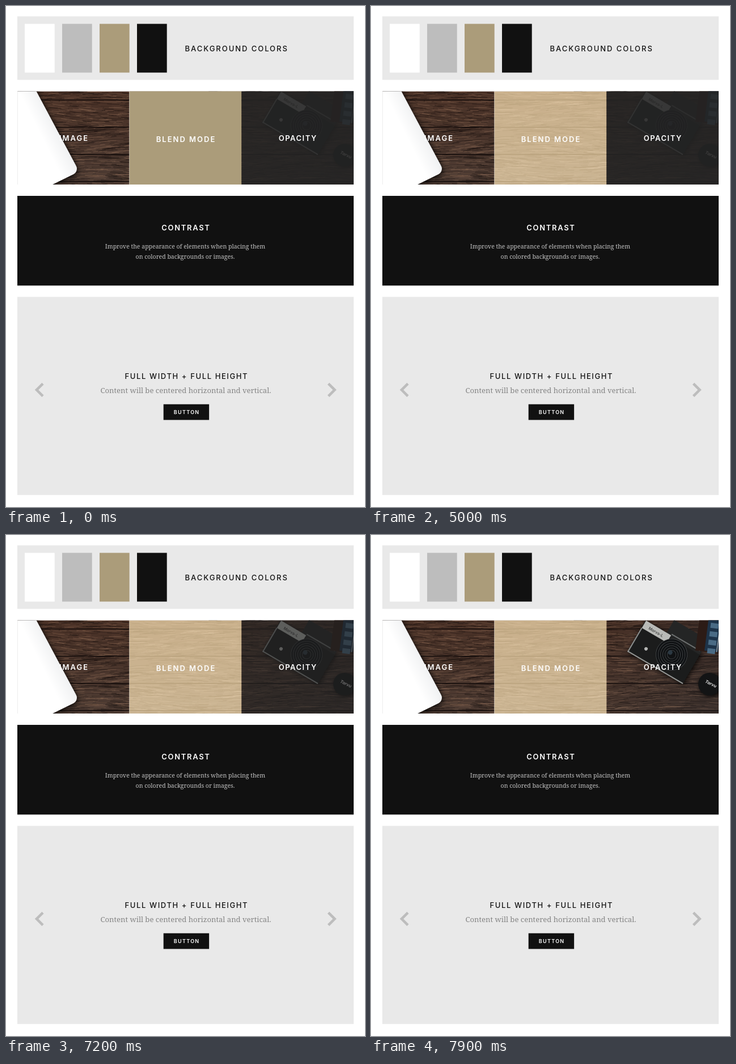
Recreate the animation shown at these times as an HTML page with a canvas. Size 633 px wide and 884 px high, loop 8 s.

```html
<!DOCTYPE html>
<html lang="en">
<head>
<meta charset="utf-8">
<title>Background styles</title>
<style>
  html, body { margin: 0; width: 100%; height: 100%; overflow: hidden; background: #fff; }
  canvas { display: block; }
</style>
</head>
<body>
<canvas id="stage" width="633" height="884"></canvas>
<script>
const W = 633, H = 884, LOOP = 8000;
const LEFT = 20, WIDE = 593, TOP = 150.5, TALL = 164.5, THIRD = WIDE / 3;
const TAN = '#ab9c7a', INK = '#111', PANEL = '#e9e9e9', GREY = '#bdbdbd';
const SANS = 'Inter, sans-serif', SERIF = '"Noto Serif", serif';
const stage = document.getElementById('stage').getContext('2d');

function layer() {
  const c = document.createElement('canvas');
  c.width = W;
  c.height = H;
  return c.getContext('2d');
}

function rect(g, x, y, w, h, fill) {
  g.fillStyle = fill;
  g.fillRect(x, y, w, h);
}

function disc(g, x, y, r, fill) {
  g.fillStyle = fill;
  g.beginPath();
  g.arc(x, y, r, 0, Math.PI * 2);
  g.fill();
}

// Centred on the visible letters: the trailing letter space is compensated.
function text(g, str, x, y, font, color, spacing = 0) {
  g.font = font;
  g.fillStyle = color;
  g.textAlign = 'center';
  g.letterSpacing = spacing + 'px';
  g.fillText(str, x + spacing / 2, y);
}

function tilted(g, x, y, angle, paint) {
  g.save();
  g.translate(x, y);
  g.rotate(angle);
  paint();
  g.restore();
}

function withShadow(g, blur, paint) {
  g.save();
  g.shadowColor = 'rgba(0,0,0,.85)';
  g.shadowBlur = blur;
  g.shadowOffsetX = g.shadowOffsetY = 2;
  paint();
  g.restore();
}

function seeded(seed) {
  return () => (seed = (seed * 16807) % 2147483647) / 2147483647;
}

function drawWood(g) {
  const rnd = seeded(77), plank = 48;
  const base = g.createLinearGradient(0, TOP, 0, TOP + TALL);
  base.addColorStop(0, '#4a3126');
  base.addColorStop(1, '#4b3a32');
  rect(g, LEFT, TOP, WIDE, TALL, base);

  for (let i = 0; i < 2600; i++) {
    const x = rnd() * W, y = TOP + rnd() * TALL, len = 8 + rnd() * 38;
    const slope = Math.sin(x / 60 + Math.floor((y - 22) / plank) * 2) * 0.12;
    g.strokeStyle = rnd() < 0.6 ? 'rgba(14,9,8,.42)' : 'rgba(176,134,106,.28)';
    g.lineWidth = 0.5 + rnd() * 0.7;
    g.beginPath();
    g.moveTo(x, y);
    g.quadraticCurveTo(x + len / 2, y + slope * len, x + len, y + slope * len * 0.6);
    g.stroke();
  }
  for (let y = 166; y < TOP + TALL; y += plank) rect(g, LEFT, y - 1, WIDE, 1.6, '#150d0b');

  const cool = g.createLinearGradient(400, 0, 613, 0);
  cool.addColorStop(0, 'rgba(38,36,38,0)');
  cool.addColorStop(1, 'rgba(38,36,38,.4)');
  rect(g, 400, TOP, 213, TALL, cool);
}

function drawLaptop(g) {
  const shade = g.createLinearGradient(70, 245, 108, 226);
  shade.addColorStop(0, '#fff');
  shade.addColorStop(0.7, '#f1f2f3');
  shade.addColorStop(1, '#cfd3d5');
  withShadow(g, 10, () => {
    g.fillStyle = shade;
    g.beginPath();
    g.moveTo(0, 140);
    g.lineTo(48, 140);
    g.arcTo(129, 292, 74, 319, 11);
    g.lineTo(74, 319);
    g.lineTo(0, 319);
    g.fill();
  });
}

function drawCamera(g) {
  tilted(g, 530, 211, 0.53, () => {
    withShadow(g, 9, () => rect(g, -70, -29, 113, 64, '#1b1c1c'));
    rect(g, -27, -55, 70, 30, '#242525');
    rect(g, -69, -29, 51, 15, '#b9bab7');
    rect(g, -70, -14, 2, 49, '#8d908f');
    rect(g, -70, 33, 113, 2, '#959795');
    rect(g, -18, -32, 58, 2, '#6d7070');
    disc(g, -44, 14, 3, '#b5b6b4');
    text(g, 'Morva-L', -44, -18, '600 7px ' + SANS, '#464746');
    for (let r = 28; r > 4; r -= 4) {
      disc(g, 0, 0, r, '#45484a');
      disc(g, 0, 0, r - 0.8, '#101214');
    }
    disc(g, -4, -2, 4, '#2b3842');
  });
}

function drawAccessories(g) {
  tilted(g, 593, 150, 0.13, () => {
    rect(g, -14, -10, 44, 66, '#2c1b16');
    rect(g, 2, -10, 24, 64, '#1d3349');
    for (let y = 4; y < 50; y += 15) rect(g, 7, y, 14, 9, '#4a6b85');
    rect(g, 23, -10, 1.2, 64, '#b4b9ba');
  });
  withShadow(g, 6, () => disc(g, 597, 263, 20, '#131415'));
  tilted(g, 599, 263, 0.47, () => text(g, 'Tarvu', 0, 2, 'italic 700 7.5px ' + SANS, '#dedede'));
}

function makePhoto() {
  const g = layer();
  g.beginPath();
  g.rect(LEFT, TOP, WIDE, TALL);
  g.clip();
  drawWood(g);
  drawLaptop(g);
  drawCamera(g);
  drawAccessories(g);
  rect(g, LEFT, TOP, 1, TALL, '#ededed');
  return g.canvas;
}

function chevron(g, x, dir) {
  g.strokeStyle = GREY;
  g.lineWidth = 4.6;
  g.beginPath();
  for (const side of [-1, 0, 1]) g.lineTo(x + 11 * dir * Math.abs(side), 677.3 + 11 * side);
  g.stroke();
}

function makePage() {
  const g = layer(), middle = W / 2;
  rect(g, 0, 0, W, H, '#fff');

  rect(g, LEFT, 18.3, WIDE, 112, PANEL);
  ['#fff', GREY, TAN, INK].forEach((color, i) => rect(g, 33 + i * 66, 31.5, 52.7, 86, color));
  text(g, 'BACKGROUND COLORS', 405.7, 80, '500 13px ' + SANS, INK, 1.95);

  rect(g, LEFT, 335, WIDE, 158.3, INK);
  text(g, 'CONTRAST', middle, 395.8, '600 13px ' + SANS, '#fff', 1.7);
  ['Improve the appearance of elements when placing them', 'on colored backgrounds or images.']
    .forEach((row, i) => text(g, row, 316, 428 + i * 18, '10.5px ' + SERIF, '#c4c4c4'));

  rect(g, LEFT, 513.3, WIDE, 349.5, PANEL);
  text(g, 'FULL WIDTH + FULL HEIGHT', 317.6, 657.7, '500 13px ' + SANS, INK, 1.6);
  text(g, 'Content will be centered horizontal and vertical.', 317, 682.5, '13.05px ' + SERIF, '#858585');
  rect(g, 277.7, 702.7, 80.4, 27.7, INK);
  text(g, 'BUTTON', 318, 719.6, '600 9px ' + SANS, '#fff', 1.3);
  chevron(g, 54, 1);
  chevron(g, 579.5, -1);

  g.drawImage(makePhoto(), 0, 0);
  return g.canvas;
}

function tint(mode, color) {
  stage.globalCompositeOperation = mode;
  rect(stage, LEFT + THIRD, TOP, THIRD, TALL, color);
  stage.globalCompositeOperation = 'source-over';
}

function drawBlend(t) {
  if (t < 1000) {
    tint('source-over', TAN);
  } else if (t >= 5000) {
    tint('screen', '#b49e78');
  } else if (t >= 3000) {
    tint('color', '#a98d64');
    tint('screen', '#231e17');
  }
  rect(stage, LEFT + THIRD - 0.5, TOP, 0.9, TALL, 'rgba(235,230,220,.7)');
}

function drawOpacity(t) {
  const step = t < 7000 ? 0 : Math.floor((t - 7000) / 100) + 1;
  const alpha = 0.87 * (1 - step / 10);
  rect(stage, LEFT + 2 * THIRD, TOP, THIRD, TALL, `rgba(36,36,36,${alpha})`);
}

const page = makePage();

function draw(now) {
  const t = now % LOOP, font = '600 13px ' + SANS;
  stage.drawImage(page, 0, 0);
  drawBlend(t);
  drawOpacity(t);
  text(stage, 'IMAGE', 119, 237.6, font, '#fff', 2);
  text(stage, 'BLEND MODE', 316.5, 239.6, font, '#fff', 2);
  text(stage, 'OPACITY', 514, 237.6, font, '#fff', 1.5);
  requestAnimationFrame(draw);
}

draw(performance.now());
</script>
</body>
</html>
```
